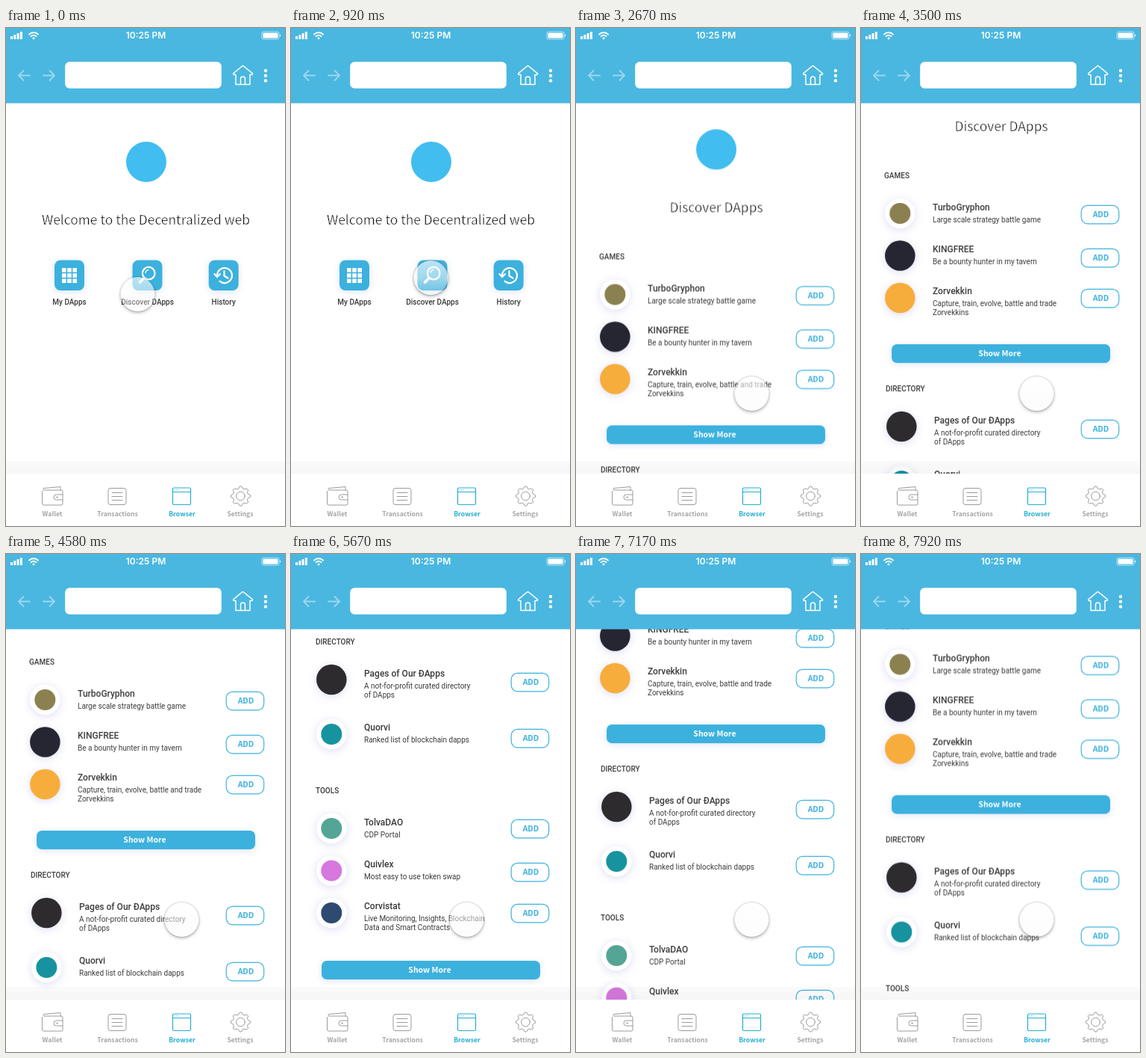
An HTML page that plays this animation: 374x666 px, repeating every 8 s.

```html
<!DOCTYPE html>
<html lang="en">
<head>
<meta charset="utf-8">
<title>DApp browser</title>
<style>
html, body { margin: 0; width: 100%; height: 100%; overflow: hidden; background: #fff; }
svg { position: absolute; left: 0; top: 0; display: block; }
text { font-family: Roboto, sans-serif; font-size: 10px; fill: #3a3a3a; }
.mid { text-anchor: middle; }
.head, .action, .tab { font-family: "Noto Sans CJK SC", "Noto Sans CJK JP", "Open Sans", sans-serif; }
/* The white outline trims the strokes to a light weight */
.head { font-weight: 300; font-size: 17.4px; fill: #111; stroke: #fff; stroke-width: .45px; }
.name { font-size: 12px; font-weight: 500; }
.label { font-weight: 500; }
.action { font-size: 10.5px; font-weight: 700; fill: #3cb1de; }
.tab { font-size: 8.7px; font-weight: 700; fill: #a6a6a6; }
.clock { font-family: Inter, sans-serif; font-size: 12px; font-weight: 600; fill: #fff; }
.line { fill: none; stroke-linecap: round; stroke-linejoin: round; }
.badge { filter: drop-shadow(0 2px 6px rgba(80, 90, 200, .2)); }
.soft { filter: drop-shadow(0 2px 5px rgba(70, 110, 190, .18)); }
#home { animation: leave 8s linear infinite; }
#discover { animation: enter 8s linear infinite; }
#list { animation: scroll 8s linear infinite; }
#touch {
  position: absolute; left: -23px; top: -23px; width: 46px; height: 46px; border-radius: 50%;
  background: linear-gradient(rgba(255, 255, 255, .65), rgba(252, 252, 252, .52) 50%, rgba(245, 245, 245, .2));
  box-shadow: 0 0 1px 1px rgba(0, 0, 0, .14), 0 2px 4px rgba(0, 0, 0, .28);
  animation: touch 8s infinite;
}
@keyframes leave { 0%, 13% { opacity: 1; } 15%, 100% { opacity: 0; } }
@keyframes enter { 0%, 13% { opacity: 0; } 15%, 100% { opacity: 1; } }
@keyframes touch {
  0%, 1% { transform: translate(176.5px, 356px); animation-timing-function: ease-in-out; }
  9%, 21.5% { transform: translate(187.5px, 334px); animation-timing-function: ease-in-out; }
  30%, 100% { transform: translate(235.5px, 489px); }
}
@keyframes scroll {
  0%, 31.25% { transform: translateY(0); animation-timing-function: cubic-bezier(.35, .2, .65, .85); }
  43.75% { transform: translateY(-125px); animation-timing-function: ease-out; }
  55%, 57.25% { transform: translateY(-178px); animation-timing-function: cubic-bezier(.4, .1, .5, 1); }
  70%, 72% { transform: translateY(-490px); animation-timing-function: cubic-bezier(.4, .2, .7, .7); }
  82.25% { transform: translateY(-394.5px); }
  99% { transform: translateY(-225.5px); }
  100% { transform: translateY(-223.5px); }
}
</style>
</head>
<body>
<svg width="374" height="666" viewBox="0 0 374 666">
  <defs>
    <linearGradient id="haze" x2="0" y2="1">
      <stop stop-color="#000" stop-opacity=".018"/>
      <stop offset="1" stop-color="#000" stop-opacity=".035"/>
    </linearGradient>
  </defs>

  <g id="home">
    <circle cx="188" cy="179" r="27" fill="#41bdf0"/>
    <text class="head mid" x="187.5" y="263">Welcome to the Decentralized web</text>
    <g id="tiles"></g>
    <g id="grid" fill="#fff"></g>
    <g class="line" stroke="#fff">
      <circle cx="191.2" cy="328" r="8.3" stroke-width="2.2"/>
      <path d="M185 334.5L179.5 340" stroke-width="3.6"/>
      <path d="M187 327.500a4.500 4.500 0 0 1 4-4" stroke-width="1.3"/>
      <path d="M283 331a10 10 0 1 1 3.500 7.600M279.500 329l3.500 4 4-4M292.500 325v6.500l5 3" stroke-width="2.2"/>
    </g>
  </g>

  <g id="discover"><g id="list">
    <circle cx="188" cy="179" r="27" fill="#41bdf0"/>
    <text class="head mid" x="188" y="263">Discover DApps</text>
  </g></g>

  <rect y="579" width="374" height="17" fill="url(#haze)"/>
  <rect y="596" width="374" height="70" fill="#fff"/>
  <g class="line" stroke="#9b9b9b" stroke-width="1">
    <path d="M48.500 619.500V636a2 2 0 0 0 2 2H74a2 2 0 0 0 2-2V620a2 2 0 0 0-2-2H50.500a2 2 0 0 1 0-2.500L73 613.500V618M76 624H67.500a3 3 0 0 0 0 7H76"/>
    <circle cx="68.5" cy="627.5" r=".7"/>
    <rect x="137" y="615.5" width="24" height="22" rx="3"/>
    <path d="M142 621.500h14M142 626.500h14M142 631.500h14"/>
    <path id="gear"/>
    <circle cx="314.5" cy="626" r="5.8"/>
  </g>
  <g class="line" stroke="#25aed0" stroke-width="1.2">
    <rect x="223.5" y="615" width="24" height="22.5" rx="1.5"/>
    <path d="M223.500 620.500h24M226 617.800h.1M228.500 617.800h.1M231 617.800h.1"/>
  </g>
  <g class="mid">
    <text class="tab" x="62" y="653">Wallet</text>
    <text class="tab" x="149.5" y="653">Transactions</text>
    <text class="tab" x="236" y="653" style="fill:#25aed0">Browser</text>
    <text class="tab" x="314" y="653">Settings</text>
  </g>

  <rect width="374" height="100.6" fill="#4ab7e0"/>
  <rect x="79.2" y="45.2" width="209.6" height="35.6" rx="6" fill="#fff"/>
  <g class="line" stroke="#fff" stroke-width="1.8">
    <path d="M32 63.500H17M23.500 57l-6.500 6.500 6.500 6.500M50 63.500h15M58.500 57l6.500 6.500-6.500 6.500" opacity=".45"/>
    <path d="M308 62.500H306a1.200 1.200 0 0 1-.8-2.200L316.500 51a1.500 1.500 0 0 1 2 0L330 60.300a1.200 1.200 0 0 1-.8 2.200H327V75.500H308ZM314.500 75.500V68a3 3 0 0 1 6 0V75.500" stroke-width="1.5"/>
    <path d="M31 8.500a8.500 8.500 0 0 1 12 0M33.500 11.200a5 5 0 0 1 7 0"/>
  </g>
  <g fill="#fff">
    <circle cx="348" cy="57" r="2.2"/><circle cx="348" cy="63.7" r="2.2"/><circle cx="348" cy="70.4" r="2.2"/>
    <circle cx="37" cy="13.7" r="1.5"/>
    <path d="M6 11h3v4h-3zM10.300 9h3v6h-3zM14.600 7h3v8h-3zM18.900 5h3v10h-3z"/>
    <rect x="344.5" y="6.5" width="20" height="7" rx="1"/>
    <rect x="343" y="5" width="23" height="10" rx="2" fill="none" stroke="#fff" stroke-width=".6"/>
    <path d="M367 8.200a2 2 0 0 1 0 3.600z"/>
  </g>
  <text class="clock mid" x="187.5" y="14">10:25 PM</text>
</svg>
<div id="touch"></div>
<script>
const byId = id => document.getElementById(id);
const add = (id, markup) => byId(id).insertAdjacentHTML('beforeend', markup);
const text = (cls, x, y, words) => `<text class="${cls}" x="${x}" y="${y}">${words}</text>`;

[['My DApps', 85], ['Discover DApps', 189.5], ['History', 291.7]].forEach(([label, x]) => add('tiles',
  `<rect class="soft" x="${x - 20}" y="310.5" width="40" height="40.5" rx="8" fill="#3cb1de"/>` +
  text('label mid', x, 370, label)));

for (let i = 0; i < 9; i++) {
  add('grid', `<rect x="${75 + i % 3 * 7.2}" y="${321 + Math.floor(i / 3) * 7.2}" width="5.6" height="5.6"/>`);
}

// Eight-toothed outline
const gear = Array.from({ length: 32 }, (_, i) => {
  const angle = (i - 1.5) * Math.PI / 16;
  const radius = i % 4 === 1 || i % 4 === 2 ? 13 : 10.3;
  return `${(314.5 + radius * Math.cos(angle)).toFixed(2)} ${(626 + radius * Math.sin(angle)).toFixed(2)}`;
});
byId('gear').setAttribute('d', `M${gear.join('L')}Z`);

const section = (x, y, label) => add('list', text('label', x, y, label));

const showMore = y => add('list',
  `<rect class="soft" x="41" y="${y}" width="293" height="25" rx="7" fill="#3cb1de"/>` +
  `<text class="action mid" x="186" y="${y + 16}" style="fill:#fff">Show More</text>`);

function item({ x, y, icon, button, name, lines, color, full }) {
  const cx = x - 43.7;
  add('list',
    `<circle class="badge" cx="${cx}" cy="${icon}" r="20.3" fill="${full ? color : '#fff'}"/>` +
    (full ? '' : `<circle cx="${cx}" cy="${icon}" r="14" fill="${color}"/>`) +
    text('name', x, y, name) +
    lines.map((line, i) => text('', x, y + 16 + i * 12, line)).join('') +
    `<rect x="295.2" y="${button - 12.2}" width="50.5" height="24.5" rx="8.5" fill="#fff" stroke="#3cb1de" stroke-width="1.2"/>` +
    text('action mid', 321.5, button + 3.9, 'ADD'));
}

section(31, 326, 'GAMES');
item({ x: 96, y: 369, icon: 373, button: 374.5, name: 'TurboGryphon', color: '#8b8050',
  lines: ['Large scale strategy battle game'] });
item({ x: 96, y: 425, icon: 429.5, button: 432.5, name: 'KINGFREE', color: '#252632', full: true,
  lines: ['Be a bounty hunter in my tavern'] });
item({ x: 96, y: 481, icon: 486, button: 486.5, name: 'Zorvekkin', color: '#f7ad3c', full: true,
  lines: ['Capture, train, evolve, battle and trade', 'Zorvekkins'] });
showMore(548);

section(33, 611, 'DIRECTORY');
item({ x: 98, y: 654, icon: 658, button: 661.5, name: 'Pages of Our ĐApps', color: '#2d2b2e', full: true,
  lines: ['A not-for-profit curated directory', 'of DApps'] });
item({ x: 98, y: 726, icon: 731, button: 736.5, name: 'Quorvi', color: '#17929f',
  lines: ['Ranked list of blockchain dapps'] });

section(33, 810, 'TOOLS');
item({ x: 98, y: 853, icon: 857, button: 857.5, name: 'TolvaDAO', color: '#54a596',
  lines: ['CDP Portal'] });
item({ x: 98, y: 909, icon: 913.5, button: 915.5, name: 'Quivlex', color: '#d678de',
  lines: ['Most easy to use token swap'] });
item({ x: 98, y: 965, icon: 970, button: 970.5, name: 'Corvistat', color: '#2d4a70',
  lines: ['Live Monitoring, Insights, Blockchain', 'Data and Smart Contracts'] });
showMore(1034);
</script>
</body>
</html>
```
